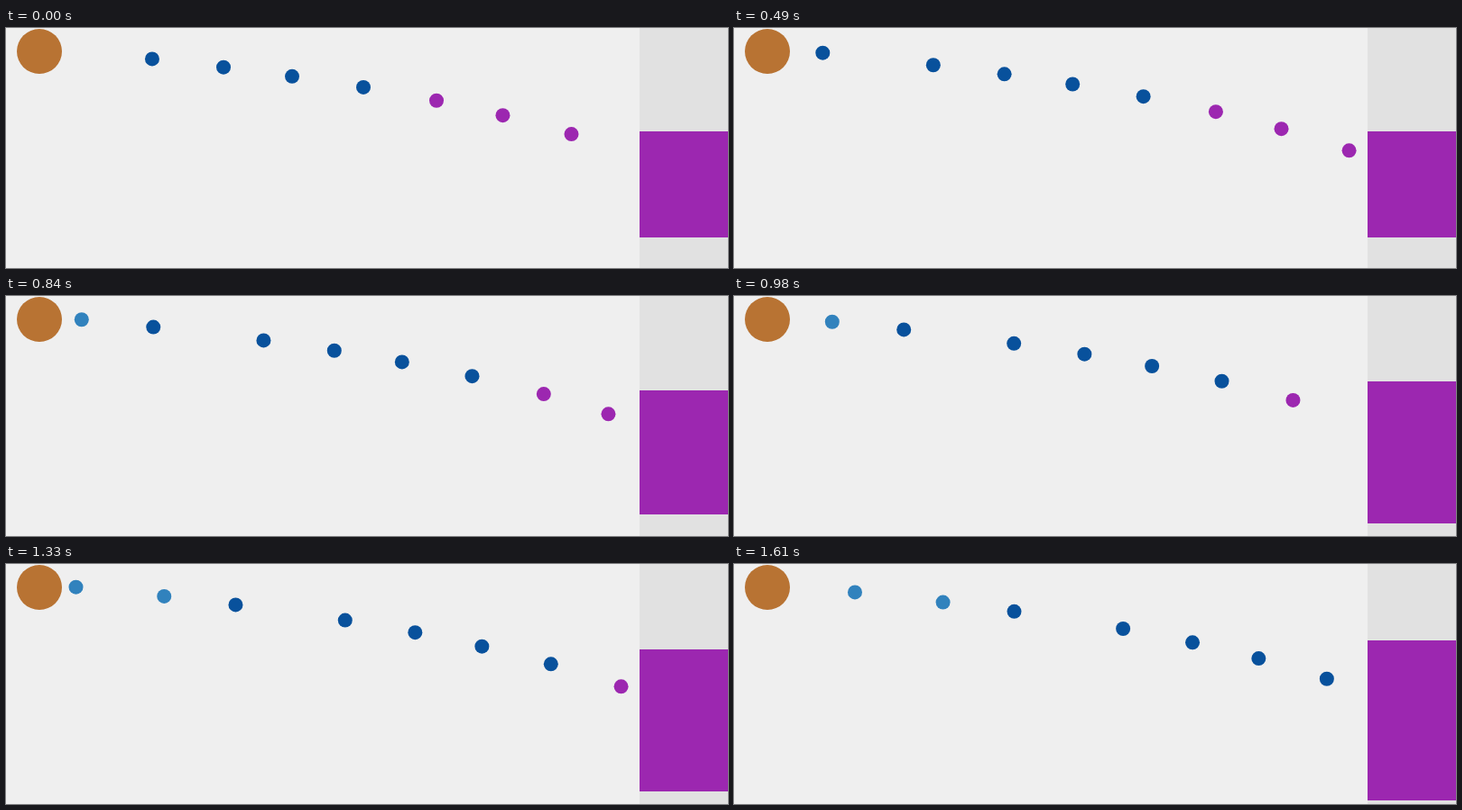
An HTML page that plays this animation: 800 by 267 pixels, repeating every 1.68 s.

```html
<!DOCTYPE html>
<html lang="en">
<head>
<meta charset="utf-8">
<title>Dots</title>
<style>
  html, body { margin: 0; width: 100%; height: 100%; overflow: hidden; background: #efefef; }
  svg { display: block; width: 800px; height: 267px; }
</style>
</head>
<body>
<svg id="stage" viewBox="0 0 800 267">
  <rect x="702" width="98" height="267" fill="#e1e1e1"/>
  <rect id="block" x="702" width="98" fill="#9c27b0"/>
  <g id="dots"></g>
  <circle cx="37" cy="26" r="25" fill="#b87333"/>
</svg>
<script>
const LOOP = 1680, STEP = 70;
const START = 77, SPAN = 603, HIT = 686;
const PURPLE = '#9c27b0', BLUE = '#08519c', LIGHT = '#3182bd';

// Distance along the path at the start of the loop, and colour.
const dots = [
  [637.7, PURPLE], [557.5, PURPLE], [481.2, PURPLE],
  [398.1, BLUE], [317.9, BLUE], [241.3, BLUE], [162, BLUE], [39.3, BLUE],
  [-40.2, LIGHT], [-138, LIGHT]
].map(([from, fill]) => {
  const el = document.createElementNS('http://www.w3.org/2000/svg', 'circle');
  el.setAttribute('r', 8);
  el.setAttribute('fill', fill);
  document.getElementById('dots').append(el);
  return { from, el };
});
const block = document.getElementById('block');

// Shared travel: [step, distance], linear in between.
const pace = [[0, 0], [2, 0], [5, 29], [7, 59], [10, 99], [14, 149], [19, 215.5], [23, 272]];

function travel(step) {
  const i = Math.max(1, pace.findIndex(([s]) => s >= step));
  const [s0, d0] = pace[i - 1], [s1, d1] = pace[i];
  return d0 + (d1 - d0) * (step - s0) / (s1 - s0);
}

// The path bends down, so horizontal speed drops a little.
const pathX = p => p - 14 * ((p - 78) / SPAN) ** 3;

function pathY(x) {
  const s = (x - 78) / SPAN;
  return 25.7 + s * (58.9 + s * (28.5 + s * (31 * s - 8)));
}

function draw(now) {
  const moved = travel(Math.floor((now % LOOP) / STEP));
  let hits = 0;
  for (const { from, el } of dots) {
    const p = from + moved, x = pathX(p);
    const hit = x >= HIT;
    if (hit) hits++;
    el.setAttribute('visibility', hit || p < START ? 'hidden' : 'visible');
    el.setAttribute('cx', x.toFixed(2));
    el.setAttribute('cy', pathY(x).toFixed(2));
  }
  const half = 59 + 10 * hits;
  block.setAttribute('y', 174 - half);
  block.setAttribute('height', 2 * half);
}

const begin = performance.now();
function tick() {
  draw(performance.now() - begin);
  requestAnimationFrame(tick);
}
tick();
</script>
</body>
</html>
```
